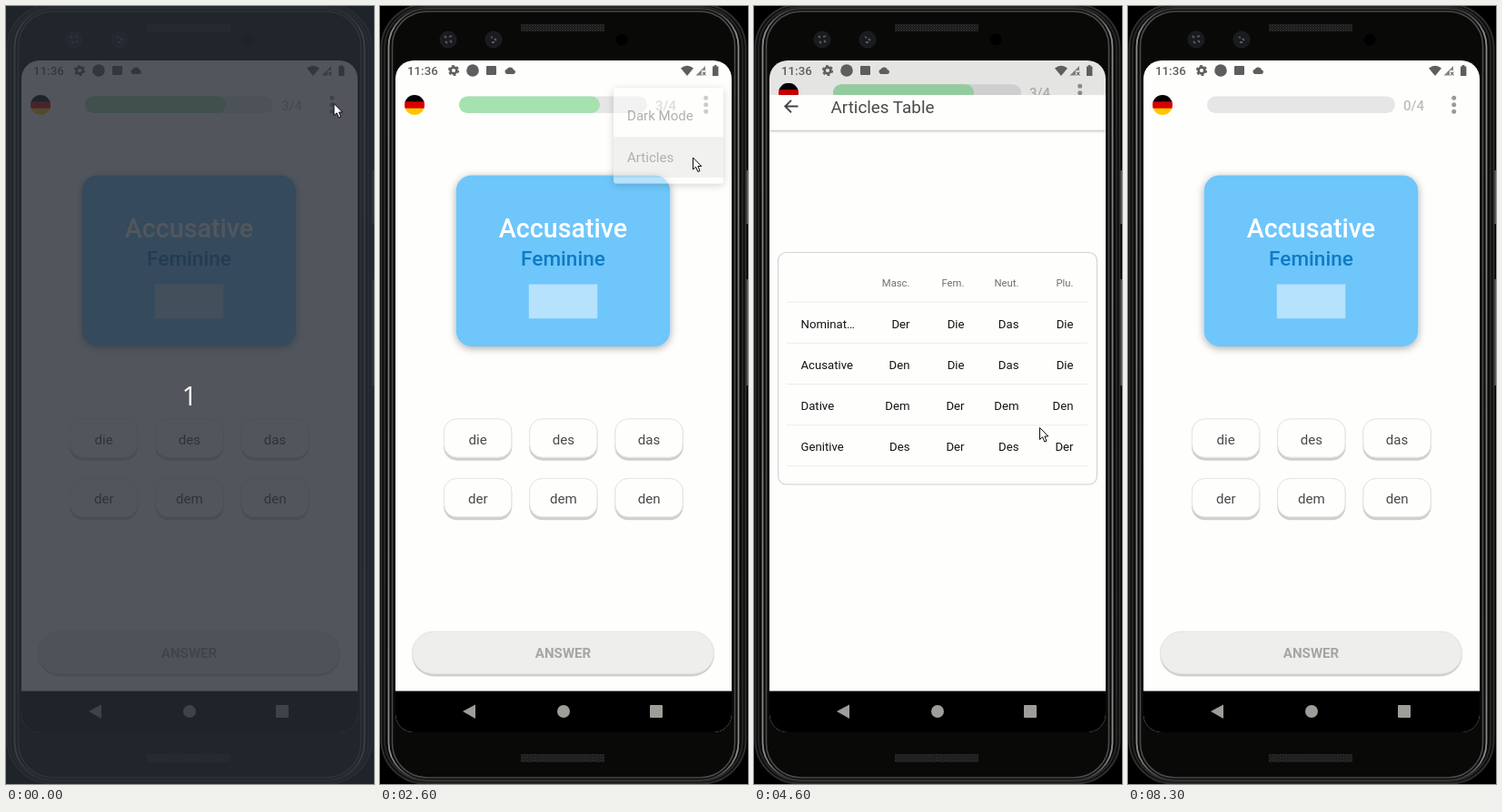
These frames come from a looping animation (405 px wide and 857 px high, 9 s). An HTML page:

```html
<!DOCTYPE html>
<html lang="en">
<head>
<meta charset="utf-8">
<title>Article quiz</title>
<style>
  html, body { margin: 0; width: 100%; height: 100%; overflow: hidden; background: #000; }
  svg { display: block; width: 405px; height: 857px; }
  text { font-family: Roboto, sans-serif; font-size: 15.08px; }
  .mid { text-anchor: middle; }
  .end { text-anchor: end; }
  .med { font-weight: 500; }
  .bold { font-weight: 700; }
  .small { font-size: 13.2px; }
  .title { font-size: 18.85px; }
</style>
</head>
<body>
<svg viewBox="0 0 405 857" xmlns="http://www.w3.org/2000/svg">
  <defs>
    <clipPath id="screenClip"><rect x="17" y="60" width="370" height="740" rx="20"/></clipPath>
    <clipPath id="revealClip"><rect id="reveal" x="17" y="60" width="370" height="695"/></clipPath>
    <clipPath id="flagClip"><circle cx="38" cy="109" r="11"/></clipPath>
    <pattern id="mesh" width="3" height="3" patternUnits="userSpaceOnUse">
      <rect width="3" height="3" fill="#161616"/><path d="M0 0L3 3M3 0L0 3" stroke="#303030" stroke-width=".7"/>
    </pattern>
    <linearGradient id="rim" x2="0" y2="1">
      <stop offset="0" stop-color="#303030"/><stop offset=".03" stop-color="#8a8a8a"/>
      <stop offset=".5" stop-color="#787878"/><stop offset=".97" stop-color="#8a8a8a"/><stop offset="1" stop-color="#303030"/>
    </linearGradient>
    <filter id="soft" x="-20%" y="-20%" width="140%" height="150%">
      <feDropShadow dx="0" dy="2" stdDeviation="4" flood-opacity=".34"/>
    </filter>
    <filter id="deep" x="-20%" y="-30%" width="140%" height="170%">
      <feDropShadow dx="0" dy="7" stdDeviation="8" flood-opacity=".45"/>
    </filter>
    <filter id="thin" x="-5%" y="-5%" width="110%" height="115%">
      <feDropShadow dx="0" dy="1.5" stdDeviation="1.2" flood-opacity=".25"/>
    </filter>
  </defs>

  <g id="phone">
    <rect width="405" height="857" fill="#000"/>
    <path d="M404 181V240M404 301V418" stroke="#5a5a5a" stroke-width="2"/>
    <rect x="1.5" y="-1.5" width="401" height="858" rx="48" fill="#0a0a09" stroke="#2e2e2e" stroke-width="2"/>
    <rect x="5" y="1" width="394" height="853" rx="46" fill="none" stroke="#262626" stroke-width="2"/>
    <rect x="9.5" y="3" width="385" height="850" rx="42" fill="none" stroke="url(#rim)" stroke-width="1.8"/>
    <rect x="13.5" y="6" width="377" height="844" rx="38" fill="#090908" stroke="#4a4a4a" stroke-width="1.6"/>
    <rect x="155" y="20" width="92" height="8" rx="1" fill="url(#mesh)"/>
    <rect x="155" y="824" width="92" height="9" rx="1" fill="url(#mesh)"/>
    <g fill="#1a1b1f" stroke="#202126">
      <circle cx="75" cy="37" r="9"/><circle cx="125" cy="37" r="9"/>
    </g>
    <circle cx="266" cy="37" r="6.5" fill="#000"/>
    <path d="M71 33l2 2M76 34l3-1M72 39l2 2M77 38l2 2M122 34l2 1M126 36l2 2M123 40l3 0" stroke="#5a5c66" stroke-width="1.8"/>
  </g>

  <g clip-path="url(#screenClip)">
    <rect x="17" y="60" width="370" height="740" fill="#fefefd"/>

    <g id="home">
      <g clip-path="url(#flagClip)">
        <rect x="27" y="98" width="22" height="8" fill="#000"/>
        <rect x="27" y="105.3" width="22" height="8" fill="#d80000"/>
        <rect x="27" y="112.7" width="22" height="8" fill="#ffc800"/>
      </g>
      <rect x="87" y="99.5" width="207" height="18.5" rx="9.2" fill="#e6e6e6"/>
      <rect id="bar" x="87" y="99.5" width="155" height="18.5" rx="9.2" fill="#a5e2b0"/>
      <text id="score" x="303" y="114.5" class="med" fill="#bebebe">3/4</text>
      <g fill="#9a9a9a"><circle cx="358.7" cy="101.3" r="2.5"/><circle cx="358.7" cy="108.8" r="2.5"/><circle cx="358.7" cy="116.2" r="2.5"/></g>
      <circle id="dotRipple" cx="359" cy="109" r="17" fill="#000"/>
      <rect x="83.7" y="186.5" width="235.6" height="188.5" rx="17" fill="#6ec6fb" filter="url(#soft)"/>
      <text x="201.5" y="255" class="mid med" style="font-size:28.6px" fill="#fff">Accusative</text>
      <text x="201.5" y="286" class="mid med" style="font-size:22.6px" fill="#0f7bc4">Feminine</text>
      <rect x="163.8" y="306.5" width="75.5" height="37.7" fill="#b7e2fd"/>
      <g id="keys"></g>
      <rect x="35" y="689" width="333" height="49.5" rx="24.7" fill="#cfcfce"/>
      <rect x="35.5" y="689" width="332" height="46.5" rx="23.5" fill="#eeeeed" stroke="#e5e5e4"/>
      <text x="201.5" y="718" class="mid bold" fill="#a5a5a5">ANSWER</text>
    </g>
    <rect id="shade" x="17" y="60" width="370" height="695"/>

    <g clip-path="url(#revealClip)">
      <g id="table">
        <rect x="17" y="60" width="370" height="695" fill="#fefefd"/>
        <rect x="17" y="60" width="370" height="75" fill="#fefefd" filter="url(#thin)"/>
        <circle id="backRipple" cx="41" cy="109" r="18" fill="#aeaeae"/>
        <path d="M48.5 109H35M41 102.3L34.3 109L41 115.7" fill="none" stroke="#444" stroke-width="1.9"/>
        <text x="84.5" y="116" class="title" fill="#4a4a4a">Articles Table</text>
        <rect x="26.5" y="270" width="351" height="255.5" rx="9" fill="none" stroke="#d2d2d2" stroke-width="1.1"/>
        <g id="rows"></g>
      </g>
    </g>

    <g id="menu">
      <rect x="257" y="90" width="121" height="105.5" rx="3" fill="#fefefd" filter="url(#soft)"/>
      <rect id="itemRipple" x="257" y="144" width="121" height="45" fill="#000"/>
      <g fill="#626262"><text x="272" y="126.3">Dark Mode</text><text x="272" y="171.5">Articles</text></g>
    </g>

    <rect id="dim" x="17" y="60" width="370" height="695"/>

    <g id="status">
      <text x="30" y="76" class="med" style="font-size:13.3px">11:36</text>
      <circle cx="81" cy="71" r="3.4" fill="none" stroke="currentColor" stroke-width="2.6"/>
      <circle cx="81" cy="71" r="5.2" fill="none" stroke="currentColor" stroke-width="1.8" stroke-dasharray="2.9 2.545"/>
      <circle cx="102" cy="71" r="6.8"/>
      <rect x="117" y="66" width="11" height="10" rx="1"/>
      <path d="M139.5 75a2.9 2.9 0 0 1 .2-5.6a4 4 0 0 1 7.3.9a2.4 2.4 0 0 1 .2 4.7z"/>
      <path d="M331 68.5Q338 63 345 68.5L338 77z"/>
      <path d="M347.5 76.5L358 66V71H354V76.5z" opacity=".75"/><path d="M355 72.5l3.4 3.8m0-3.8l-3.4 3.8" stroke="currentColor" stroke-width="1.1"/>
      <path d="M366 66.5h1.8V65h2.6v1.5h2V77H366z"/>
    </g>

    <g id="dialog">
      <rect x="41" y="344" width="321" height="148" rx="2" fill="#fefefd" filter="url(#deep)"/>
      <text x="64" y="381.5" class="title med" fill="#1e1e1e">Warning!</text>
      <g fill="#303030">
        <text x="63.5" y="410.5">Seeing the articles table means you lose</text>
        <text x="63.5" y="428.5">your current answer streak!</text>
      </g>
      <g class="med" fill="#2478a8">
        <text x="228.5" y="471" class="small">CANCEL</text><text x="311.5" y="471" class="small">OK</text>
      </g>
    </g>

    <rect x="17" y="754.6" width="370" height="46" fill="#000"/>
    <g fill="#9f9d99"><path d="M91 777L105 769.5V785z"/><circle cx="202" cy="777" r="7"/><rect x="297" y="770" width="14" height="14" rx="1"/></g>
  </g>

  <g id="count">
    <rect width="405" height="857" fill="#272c35" opacity=".8"/>
    <text x="202" y="439.5" class="mid" style="font-family:'Open Sans',sans-serif;font-size:30px" fill="#fff">1</text>
  </g>
  <path id="cursor" d="M.5 .5V13.5L3.6 10.8L5.8 16L8 15.1L5.9 10H9.8Z" fill="#fff" stroke="#000" stroke-width=".95"/>
</svg>
<script>
const $ = id => document.getElementById(id);
const LOOP = 9000, STEP = 100, TOP = 60, HEIGHT = 695;
const OPEN = 4361, CLOSE = 6850, SLIDE = 425;

$('keys').innerHTML = ['die', 'des', 'das', 'der', 'dem', 'den'].map((word, i) => {
  const x = 70 + i % 3 * 94.2, y = i < 3 ? 454.7 : 520.3;
  return `<rect x="${x}" y="${y}" width="75.3" height="46" rx="15" fill="#cfcfce"/>
    <rect x="${x + .5}" y="${y + .2}" width="74.3" height="42.3" rx="14" fill="#fefefd" stroke="#e6e6e5"/>
    <text x="${x + 37.7}" y="${y + 28}" class="mid" fill="#484848">${word}</text>`;
}).join('');

const cells = ['Nominat… Der Die Das Die', 'Acusative Den Die Das Die',
  'Dative Dem Der Dem Den', 'Genitive Des Der Des Der'];
const rightCell = (word, i, y, style) => `<text x="${171.5 + i * 60}" y="${y}" class="end" ${style}>${word}</text>`;
$('rows').innerHTML =
  ['Masc.', 'Fem.', 'Neut.', 'Plu.'].map((w, i) => rightCell(w, i, 307, 'style="font-size:11.3px" fill="#707070"')).join('') +
  cells.map((line, r) => {
    const [name, ...words] = line.split(' '), y = 353.3 + r * 45;
    return `<text x="51.5" y="${y}" style="font-size:13.2px" fill="#141414">${name}</text>` +
      words.map((w, i) => rightCell(w, i, y, 'style="font-size:13.2px" fill="#141414"')).join('');
  }).join('') +
  [0, 1, 2, 3, 4].map(i => `<path d="M36 ${324.5 + i * 45.2}H367" stroke="#ebebeb"/>`).join('');

// Piecewise linear value over [time, value] points
function track(t, points) {
  if (t <= points[0][0]) return points[0][1];
  for (let i = 1; i < points.length; i++) {
    const [t0, a] = points[i - 1], [t1, b] = points[i];
    if (t <= t1) return a + (b - a) * (t - t0) / (t1 - t0);
  }
  return points[points.length - 1][1];
}

// Cubic bezier (.35, .45, 0, 1)
function ease(x) {
  if (x <= 0) return 0;
  if (x >= 1) return 1;
  let lo = 0, hi = 1, s;
  for (let i = 0; i < 24; i++) {
    s = (lo + hi) / 2;
    if (1.05 * (1 - s) ** 2 * s + s ** 3 < x) lo = s; else hi = s;
  }
  return 1.35 * (1 - s) ** 2 * s + 3 * (1 - s) * s * s + s ** 3;
}

const path = [
  [1300, 360.5, 107], [1700, 349, 143], [1800, 349, 143], [1900, 349, 159], [2100, 349, 159],
  [2200, 344, 166.5], [2600, 344, 166.5], [3100, 315.5, 478], [4300, 315.5, 478], [4600, 314, 464],
  [5200, 249, 516], [5300, 205, 330], [5400, 191, 261.5], [5500, 191, 261.5], [6000, 61, 118],
  [7200, 61, 118], [7700, 197, 119], [8000, 85, 13], [8100, 85, 13], [8200, 66, -3]
];
const pathX = path.map(p => [p[0], p[1]]), pathY = path.map(p => [p[0], p[2]]);

const fade = (id, value) => {
  $(id).setAttribute('opacity', value);
  $(id).style.display = value > 0 ? '' : 'none';
};
const shift = (id, x, y) => $(id).setAttribute('transform', `translate(${x} ${y})`);

function draw(time) {
  const t = Math.floor(time % LOOP / STEP) * STEP;
  const p = t < CLOSE ? ease((t - OPEN) / SLIDE) : 1 - ease((t - CLOSE) / SLIDE);
  const away = (1 - p) * HEIGHT;

  fade('count', t < 500 ? 1 : 0);
  fade('dotRipple', t === 1000 ? .12 : 0);
  fade('menu', track(t, [[1000, 0], [1200, 1], [2500, 1], [2700, 0]]));
  fade('itemRipple', t === 2500 || t === 2600 ? .1 : 0);
  fade('dialog', track(t, [[2600, 0], [2800, 1], [4200, 1], [4300, .3], [4400, 0]]));
  fade('dim', track(t, [[2600, 0], [2900, .6], [4200, .6], [4300, .4], [4500, 0]]));

  const tint = t >= 2700 && t < 4300 ? '#fff' : t === 4300 ? '#7e7e7d' : '#5e5e5e';
  $('status').setAttribute('fill', tint);
  $('status').setAttribute('color', tint);

  shift('home', 0, -.02 * HEIGHT * p);
  fade('shade', Math.min(p / .36, 1) * .1);
  $('reveal').setAttribute('y', TOP + away);
  shift('table', 0, away * .041);
  fade('table', p > 0 ? 1 : 0);
  fade('backRipple', track(t, [[6700, 0], [6800, 1], [6900, 1], [7200, 0]]));

  $('bar').setAttribute('width', track(t, [[6900, 155], [7400, 0]]));
  $('score').textContent = t < 7000 ? '3/4' : '0/4';

  shift('cursor', track(t, pathX), track(t, pathY));
  fade('cursor', t < 8300 ? 1 : 0);
}

const start = performance.now();
function tick() {
  draw(performance.now() - start);
  requestAnimationFrame(tick);
}
draw(0);
requestAnimationFrame(tick);
</script>
</body>
</html>
```
